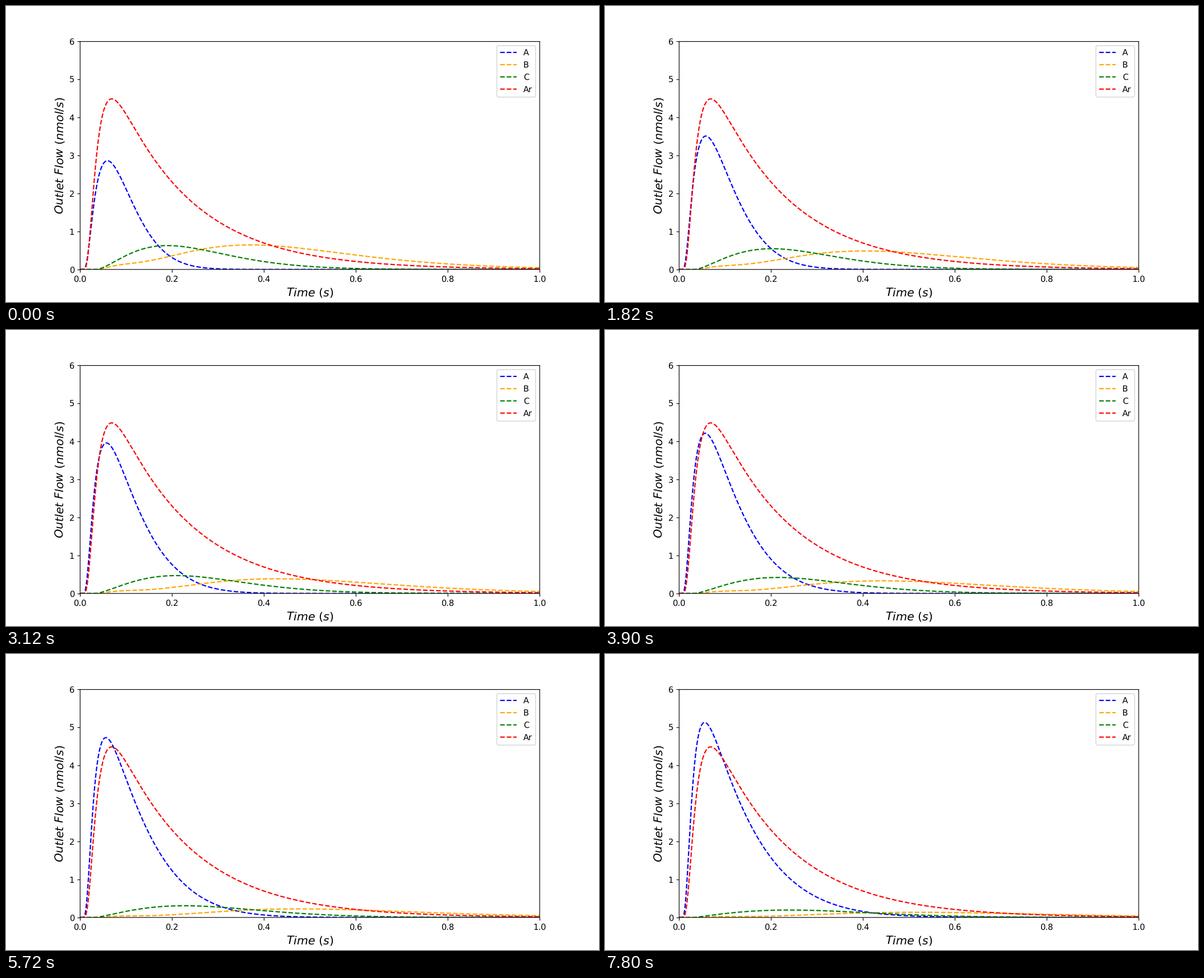
Write a matplotlib script that moves like this. It is 1058 px wide and 529 px high and loops after 8 s.

```python
import numpy as np
import matplotlib.pyplot as plt
from matplotlib.animation import FuncAnimation

# Smooth subpixel rendering
plt.rcParams.update({"path.snap": False, "text.hinting": "none"})

LOOP, TICK, STEP = 8000, 40, 260  # ms
LAST = 30                         # index of the final curve set

t = np.linspace(0, 1, 1001)
t[0] = 1e-4


def diffusion(k):
    """Outlet flow of an inert pulse with diffusion rate k."""
    tau = k * t
    n = np.arange(12)[:, None]
    odd = 2 * n + 1
    terms = (-1.0) ** n * odd * np.exp(-odd ** 2 / (4 * tau))
    return k * terms.sum(axis=0) / np.sqrt(np.pi * tau ** 3)


def hump(peak, m, q, onset=.035):
    """Unit-height skewed hump starting at onset."""
    r = np.maximum(t - onset, 1e-6) / peak
    return np.exp(m * (np.log(r) + (1 - r ** q) / q))


INERT = diffusion(2.427)
FREE_A = diffusion(2.94)
SHOULDER = .155 * hump(.06, 2, 1)


def reactant(s):
    """A: free diffusion damped by an early uptake and a growing reaction."""
    early = .46 - .73 * s + .297 * s ** 2
    late = 1.88 * np.exp(-1.36 * s - .42 * s ** 2)
    loss = (early * np.exp(-15 * (t - .06))
            + late * (t / .2) ** (1.95 - .07 * s))
    return FREE_A * np.exp(-loss)


def slow_product(s):
    """B: late broad hump with a small shoulder in front."""
    height = .645 * np.exp(-1.1 * s - .46 * s ** 2)
    return height * (hump(.335 + .145 * s, 3.25, 1 + .2 * s) + SHOULDER)


def fast_product(s):
    """C: earlier hump that flattens as s grows."""
    height = .628 * np.exp(-.43 * s - .74 * s ** 2)
    return height * hump(.155 + .05 * s, 1.55 - .55 * s, 1.3 + .4 * s)


SPECIES = (("A", "blue", reactant),
           ("B", "orange", slow_product),
           ("C", "green", fast_product))

fig, ax = plt.subplots(figsize=(10, 5), dpi=105.8)
fig.subplots_adjust(left=.125, right=.9, bottom=.11, top=.88)
lines = [ax.plot(t, flow(0), "--", color=color, label=name)[0]
         for name, color, flow in SPECIES]
ax.plot(t, INERT, "--", color="red", label="Ar")
ax.set(xlim=(0, 1), ylim=(0, 6))
ax.set_xlabel(r"$Time\ (s)$", fontsize=14)
ax.set_ylabel(r"$Outlet\ Flow\ (nmol/s)$", fontsize=14)
ax.legend(loc="upper right")


def update(i):
    step = min((i * TICK + TICK // 2) // STEP, LAST)
    for line, (_, _, flow) in zip(lines, SPECIES):
        line.set_ydata(flow(step / LAST))
    return lines


anim = FuncAnimation(fig, update, frames=LOOP // TICK, interval=TICK,
                     repeat=True, repeat_delay=0)
plt.show()
```
